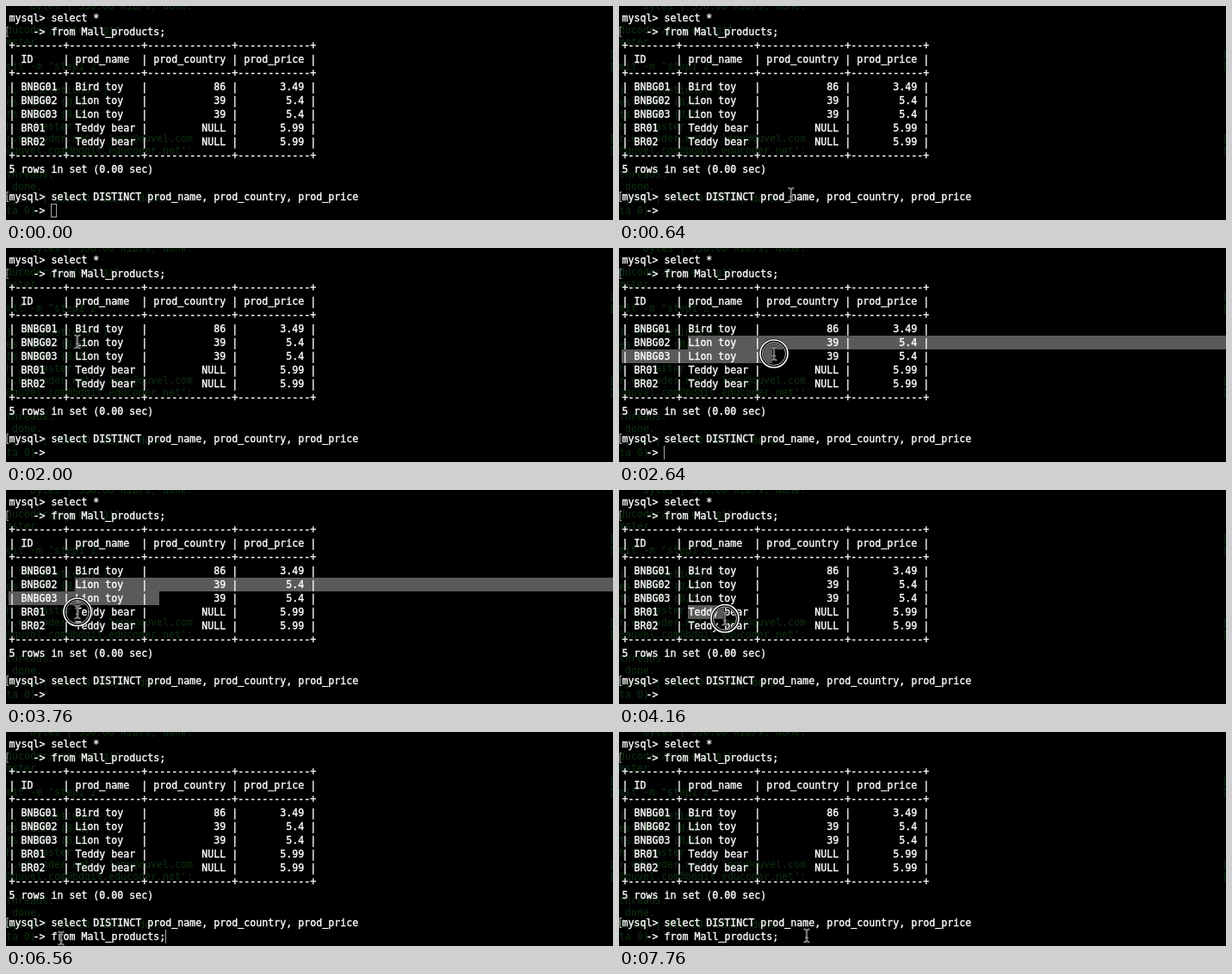
Write an HTML page that moves like this. It is 705 by 249 pixels and loops after 8 s.

```html
<!DOCTYPE html>
<html lang="en">
<head>
<meta charset="utf-8">
<title>Terminal session</title>
<style>
  html, body { margin: 0; width: 100%; height: 100%; overflow: hidden; background: #000; }
  svg { display: block; }
  text { font: 11.64px "DejaVu Sans Mono", "Liberation Mono", monospace; white-space: pre; fill: #fff; }
  #terminal text { stroke: #fff; stroke-width: .35px; }
  #backdrop text { fill: #0e2f10; }
  #selection rect { fill: #5a5a5a; }
  .line { fill: none; stroke: #fff; }
  #beamEdge { stroke: #222; stroke-width: 3; }
  #beam { stroke: #8c8c8c; stroke-width: 1.5; }
</style>
</head>
<body>
<svg id="stage" width="705" height="249" viewBox="0 0 705 249">
  <defs>
    <path id="beamShape" d="M-3.5-7.5Q0-7.5 0-5Q0-7.5 3.5-7.5M0-5V5M-3.5 7.5Q0 7.5 0 5Q0 7.5 3.5 7.5M-2 2.5h4"/>
  </defs>
  <rect width="705" height="249"/>
  <g id="backdrop"></g>
  <g id="selection"><rect id="selFirst" height="16"/><rect id="selLast" height="16"/></g>
  <g id="terminal"></g>
  <path class="line" d="M3 24.5h-2v11h2" stroke-opacity=".6"/>
  <path class="line" d="M3 216.5h-2v11h2" stroke-opacity=".75"/>
  <rect id="caret" class="line" x="52.5" y="230.5" width="6" height="15" stroke-opacity=".65"/>
  <path id="caretEdge" class="line" stroke-opacity=".65"/>
  <g id="pointer">
    <g id="ring" class="line">
      <circle r="15" stroke="#000" stroke-width="5"/>
      <circle r="16" stroke-width="1.6"/>
      <circle r="13.5" stroke="#bbb"/>
    </g>
    <use id="beamEdge" class="line" href="#beamShape"/>
    <use id="beam" class="line" href="#beamShape"/>
  </g>
</svg>
<script>
const LOOP = 8000, STEP = 80, WIDTH = 705;
const CELL = 7, LINE = 16, LEFT = 3, TOP = 6;
const $ = id => document.getElementById(id);

function addText(parent, x, y, content) {
  const node = document.createElementNS("http://www.w3.org/2000/svg", "text");
  node.setAttribute("x", x);
  node.setAttribute("y", y);
  node.textContent = content;
  parent.appendChild(node);
  return node;
}

function set(node, attributes) {
  for (const name in attributes) node.setAttribute(name, attributes[name]);
}

function show(node, visible) {
  node.setAttribute("visibility", visible ? "visible" : "hidden");
}

// Faint window showing through: [x, line, text]
const backdropY = line => 4 + line * 14;
[
  [28, 0, "bytes | 350.00 KiB/s, done."],
  [0, 2, "ducoder/project.git"],
  [0, 3, "mster"],
  [0, 5, "mit -m \"step1 2\""],
  [0, 7, "), 0 deletions(-)"],
  [0, 8, "es: 100% (8/8)"],
  [0, 9, "ts: 100% (8/8)"],
  [0, 10, "h in master"],
  [0, 11, "r.educoder.net': lenu@quvel.com"],
  [0, 12, "@quvel.com@bdgit.educoder.net':"],
  [0, 14, "threads."],
  [7, 15, "done."],
  [0, 16, "bytes | 350.00 KiB/s, done."],
  [0, 17, "ta 0)"]
].forEach(([x, line, content]) => addText($("backdrop"), x, backdropY(line), content));
[4, 5, 11, 12].forEach(line => addText($("backdrop"), 700, backdropY(line), "]"));

const rule = "+" + [8, 12, 14, 12].map(n => "-".repeat(n)).join("+") + "+";
const tableRow = (id, name, country, price) =>
  `| ${id.padEnd(6)} | ${name.padEnd(10)} | ${country.padStart(12)} | ${price.padStart(10)} |`;

const screen = [
  "mysql> select *",
  "    -> from Mall_products;",
  rule,
  tableRow("ID", "prod_name", "prod_country", "prod_price"),
  rule,
  tableRow("BNBG01", "Bird toy", "86", "3.49"),
  tableRow("BNBG02", "Lion toy", "39", "5.4"),
  tableRow("BNBG03", "Lion toy", "39", "5.4"),
  tableRow("BR01", "Teddy bear", "NULL", "5.99"),
  tableRow("BR02", "Teddy bear", "NULL", "5.99"),
  rule,
  "5 rows in set (0.00 sec)",
  "",
  "mysql> select DISTINCT prod_name, prod_country, prod_price",
  "    -> "
];
const rowTop = row => TOP + row * LINE;
const colX = col => LEFT + col * CELL;
const addLine = (col, row, content) => addText($("terminal"), colX(col) + 0.4, rowTop(row) + 12, content);
screen.forEach((line, row) => addLine(0, row, line));
const pasted = addLine(7, 14, "from Mall_products;");

// Pointer path: [ms, x, y]
const path = [
  [160, 240, 262], [960, 178, 196], [1200, 178, 196], [1280, 171, 176],
  [2000, 83, 109], [2400, 83, 109], [2640, 180, 123], [3040, 180, 123],
  [3520, 83, 142], [3840, 83, 142], [4480, 163, 157], [4640, 163, 157],
  [5040, 68, 254], [5120, 68, 254], [5280, 64, 240], [7120, 64, 240],
  [7360, 180, 236], [7440, 180, 236], [7760, 218, 237]
];

function pointerAt(t) {
  const next = path.findIndex(key => key[0] > t);
  if (next === 0) return path[0].slice(1);
  if (next < 0) return path[path.length - 1].slice(1);
  const [t0, x0, y0] = path[next - 1], [t1, x1, y1] = path[next];
  const u = (t - t0) / (t1 - t0), ease = u * u * (3 - 2 * u);
  return [x0 + (x1 - x0) * ease, y0 + (y1 - y0) * ease];
}

const within = (t, start, end) => t >= start && t < end;
const PASTE = 6560;
const presses = [[2320, 2960], [3760, 4480], [5360, 5600]];
const drags = [
  { from: 2480, release: 2960, clear: 3920, row: 6 },
  { from: 3920, release: 4480, clear: 5360, row: 8 }
];

function drawSelection(t) {
  const drag = drags.find(d => within(t, d.from, d.clear));
  show($("selection"), drag);
  if (!drag) return;
  const [x, y] = pointerAt(Math.min(t, drag.release));
  const startX = colX(11);
  const endX = colX(Math.round((x - LEFT) / CELL));
  const wraps = Math.floor((y - TOP) / LINE) > drag.row;
  set($("selFirst"), { x: startX, y: rowTop(drag.row), width: wraps ? WIDTH - startX : Math.max(0, endX - startX) });
  set($("selLast"), { x: LEFT, y: rowTop(drag.row + 1), width: wraps ? endX - LEFT : 0 });
}

function drawCaret(t) {
  const edgeX = colX(t < PASTE ? 7 : 26) + 0.5;
  show($("caret"), t < 400 || within(t, 6160, PASTE));
  show($("caretEdge"), within(t, 2560, 2720) || within(t, PASTE, 7200));
  set($("caretEdge"), { d: `M${edgeX} 230v16` });
}

function draw(time) {
  const t = Math.floor((time % LOOP) / STEP) * STEP;
  const [x, y] = pointerAt(t);
  set($("pointer"), { transform: `translate(${x.toFixed(1)} ${y.toFixed(1)})` });
  show($("ring"), presses.some(([start, end]) => within(t, start, end)));
  drawSelection(t);
  show(pasted, t >= PASTE);
  drawCaret(t);
}

const started = performance.now();
function tick() {
  draw(performance.now() - started);
  requestAnimationFrame(tick);
}
tick();
</script>
</body>
</html>
```
